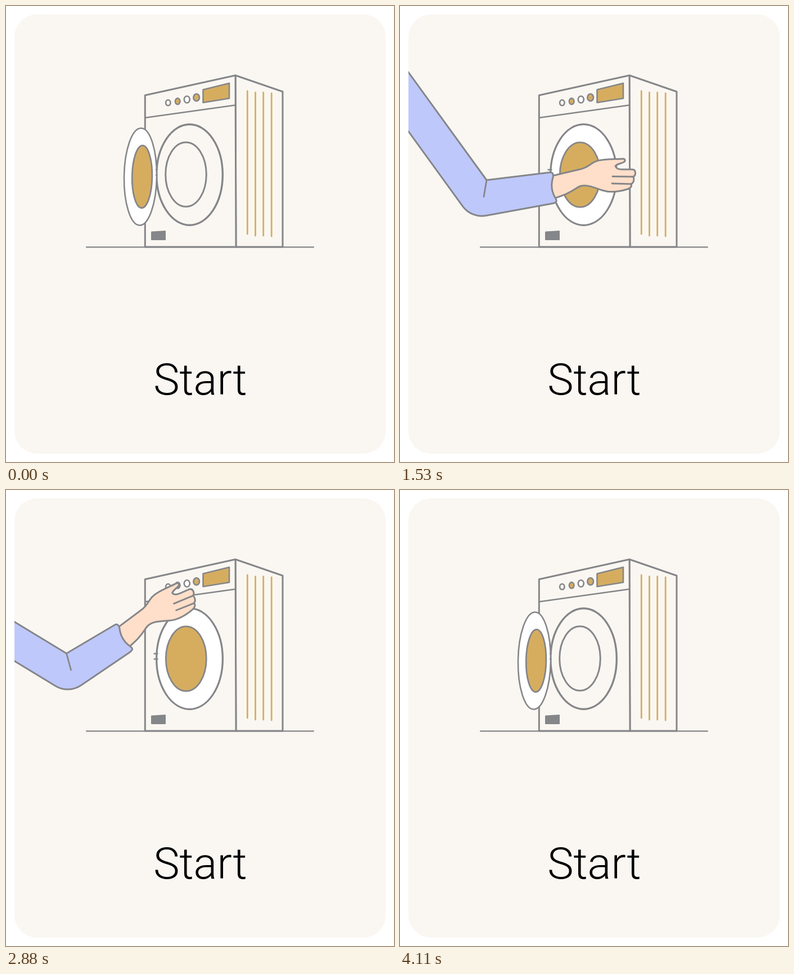
Animation of 690 by 812 pixels, one loop 4530 ms. Source, as an HTML page with a canvas:

```html
<!DOCTYPE html>
<html lang="en">
<head>
<meta charset="utf-8">
<title>Start</title>
<style>
html, body { margin: 0; width: 100%; height: 100%; overflow: hidden; background: #fff; }
canvas { display: block; }
</style>
</head>
<body>
<canvas id="stage" width="690" height="812"></canvas>
<script>
const ctx = document.getElementById('stage').getContext('2d');
const LOOP = 4530, STEP = 30;
const GREY = '#858689', GOLD = '#d6ad5f', CARD = '#faf7f2';
const SLEEVE = '#bfc8fb', SKIN = '#ffdfc9';
const HINGE = 268, OPEN = -58, CLOSED = 117;

const clamp = v => Math.min(1, Math.max(0, v));
const span = (t, from, to) => clamp((t - from) / (to - from));
const lerp = (a, b, k) => a + (b - a) * k;
const sine = u => (1 - Math.cos(Math.PI * u)) / 2;
const quart = u => u < 0.5 ? 8 * u ** 4 : 1 - 8 * (1 - u) ** 4;
const rad = deg => deg * Math.PI / 180;

function paint(fill, width = 3, path) {
  const args = path ? [path] : [];
  if (fill) {
    ctx.fillStyle = fill;
    ctx.fill(...args);
  }
  if (width) {
    ctx.lineWidth = width;
    ctx.stroke(...args);
  }
}

function poly(points, fill, width, closed = true) {
  ctx.beginPath();
  points.forEach(([x, y]) => ctx.lineTo(x, y));
  if (closed) ctx.closePath();
  paint(fill, width);
}

function oval(x, y, rx, ry, fill, width, tilt = 0) {
  ctx.beginPath();
  ctx.ellipse(x, y, rx, ry, tilt, 0, Math.PI * 2);
  paint(fill, width);
}

function drawMachine() {
  ctx.strokeStyle = GREY;
  poly([[143, 429.3], [547, 429.3]], null, 2.2, false);
  poly([[408, 123.5], [492, 152.5], [492, 429], [409, 429]], CARD);
  poly([[247.3, 159], [408, 123.5], [409, 429], [247.3, 429]], CARD);
  poly([[247.3, 199], [408, 176.5]], null, 2.6, false);
  poly([[350.5, 149], [397, 137.5], [397, 164.5], [350.5, 172]], GOLD, 2.6);
  oval(288.3, 172.3, 4.2, 5, CARD, 2.6);
  oval(305.2, 169.8, 4.3, 5.4, GOLD, 2.6);
  oval(321.8, 166.5, 5, 6, '#fff', 2.6);
  oval(338.7, 162.9, 5.3, 6.4, GOLD, 2.6);
  poly([[259, 402.5], [283, 401], [283, 416], [259, 416]], GREY, 2);
  ctx.strokeStyle = GOLD;
  [[429.3, 151.5, 406], [443.5, 154, 409], [457.7, 154, 409], [472.2, 155.5, 410]]
    .forEach(([x, top, bottom]) => poly([[x, top], [x, bottom]], null, 2.8, false));
  ctx.strokeStyle = GREY;
  oval(326.5, 300.5, 58.8, 89.7, null, 3.4);
  oval(320, 300, 36.3, 57.3, null, 3);
}

// Signed distance from the hinge to the free edge of the door.
function doorReach(t) {
  if (t < 3600) return Math.min(CLOSED, OPEN + 188 * quart(span(t, 880, 1525)));
  return t < 3850
    ? lerp(CLOSED, -121, sine(span(t, 3600, 3850)))
    : lerp(-121, OPEN, sine(span(t, 3850, 4110)));
}

function drawDoor(reach) {
  const x = HINGE + reach / 2;
  const y = 296.5 - 0.0753 * reach + 0.000937 * reach ** 2;
  const rx = Math.max(1, Math.abs(reach) / 2);
  const ry = 93.1 + 0.062 * reach - 0.00076 * reach ** 2;
  const tilt = reach < 100 ? 0.015 : 0;
  oval(x, y, rx, ry - 0.4, '#fff', 2.6, tilt);
  oval(x - 0.053 * reach, y, rx * 0.615, ry * 0.64, GOLD, 2.8, tilt);
  const start = reach > 110 ? 263.5 : 267;
  const end = reach > 110 ? 269.5 : 268.5;
  for (const tickY of [291.5, 301]) {
    poly([[start, tickY], [end, tickY]], null, 2.4, false);
  }
}

function armPose(t) {
  const enter = sine(span(t, 60, 830));
  const pull = quart(span(t, 880, 1525));
  const lift = sine(span(t, 1530, 2220) ** 0.8);
  const leave = -355 * sine(span(t, 2850, 3270));
  const slide = lerp(-340, -119.5, enter) + 183.5 * pull;
  const flatten = 3.3 * Math.max(0, slide) / 64;
  return {
    elbowX: lerp(90 + slide, 112, lift) + leave,
    elbowY: lerp(310, 291, lift),
    cuffX: lerp(205 + slide, 200, lift) + leave,
    cuffY: lerp(296, 239, lift),
    turn: rad(-23.5) * lift ** 0.78,
    slope: rad(lerp(57.4 - flatten, 31.3, lift)),
    lift
  };
}

const hand = new Path2D(
  'M200 304 L255 291 C275 287 275 276 296 274 C312 272 322 273 332 272 ' +
  'C337 272 337 276 334 278 C328 281 322 281 319 285 C320 289 325 291 331 291 ' +
  'L349 291 C356 291 356 301 351 304 C353 308 352 315 347 317 ' +
  'C349 321 346 324 341 326 C325 331 310 333 295 328 ' +
  'C280 323 268 317 256 321 C246 325 240 335 200 345 Z');
const fingers = new Path2D('M351 304 L314 303.5 M347 317 L313 316');

function inForearm(pose, draw) {
  ctx.save();
  ctx.translate(pose.cuffX, pose.cuffY);
  ctx.rotate(pose.turn);
  ctx.translate(-205, -296);
  draw();
  ctx.restore();
}

function drawArm(pose) {
  const { elbowX, elbowY, slope, lift } = pose;
  inForearm(pose, () => {
    paint(SKIN, 3, hand);
    paint(null, 2.8, fingers);
  });
  const dx = 400 * Math.cos(slope), dy = 400 * Math.sin(slope);
  const outerX = elbowX + lerp(-27, 3.6, lift);
  const outerY = elbowY + lerp(68, 72, lift);
  ctx.beginPath();
  ctx.moveTo(elbowX - dx, elbowY - dy);
  ctx.lineTo(elbowX, elbowY);
  inForearm(pose, () => {
    ctx.lineTo(201, 296.5);
    ctx.bezierCurveTo(208, 295, 209, 300, 208, 305);
    ctx.bezierCurveTo(204, 318, 206, 332, 213, 343);
    ctx.bezierCurveTo(216, 349, 213, 350, 208, 351.5);
  });
  ctx.arcTo(outerX, outerY, outerX - dx, outerY - dy, 42);
  ctx.lineTo(outerX - dx, outerY - dy);
  paint(SLEEVE, 3);
  poly([[elbowX, elbowY], [elbowX + lerp(-5, 8, lift), elbowY + 29.5]], null, 2.8, false);
}

function render(t) {
  ctx.fillStyle = '#fff';
  ctx.fillRect(0, 0, 690, 812);
  ctx.save();
  ctx.beginPath();
  ctx.roundRect(15, 15, 660.5, 782, 40);
  ctx.fillStyle = CARD;
  ctx.fill();
  ctx.clip();
  ctx.lineCap = ctx.lineJoin = 'round';

  drawMachine();
  const reach = doorReach(t);
  const armVisible = t >= 90 && t < 3270;
  const gripping = reach < 0 && t < 1500;
  const pose = armPose(t);
  if (armVisible && gripping) drawArm(pose);
  drawDoor(reach);
  if (armVisible) {
    ctx.save();
    if (gripping) {
      // The thumb stays behind the door while the fingers wrap its rim.
      ctx.beginPath();
      ctx.rect(0, 289, 690, 200);
      ctx.clip();
    }
    drawArm(pose);
    ctx.restore();
  }

  ctx.fillStyle = '#000';
  ctx.font = '300 78px Roboto, sans-serif';
  ctx.textAlign = 'center';
  ctx.fillText('Start', 345.5, 692);
  ctx.restore();
}

const began = performance.now();
function tick() {
  const t = (performance.now() - began) % LOOP;
  render(Math.floor(t / STEP) * STEP);
  requestAnimationFrame(tick);
}
tick();
</script>
</body>
</html>
```
